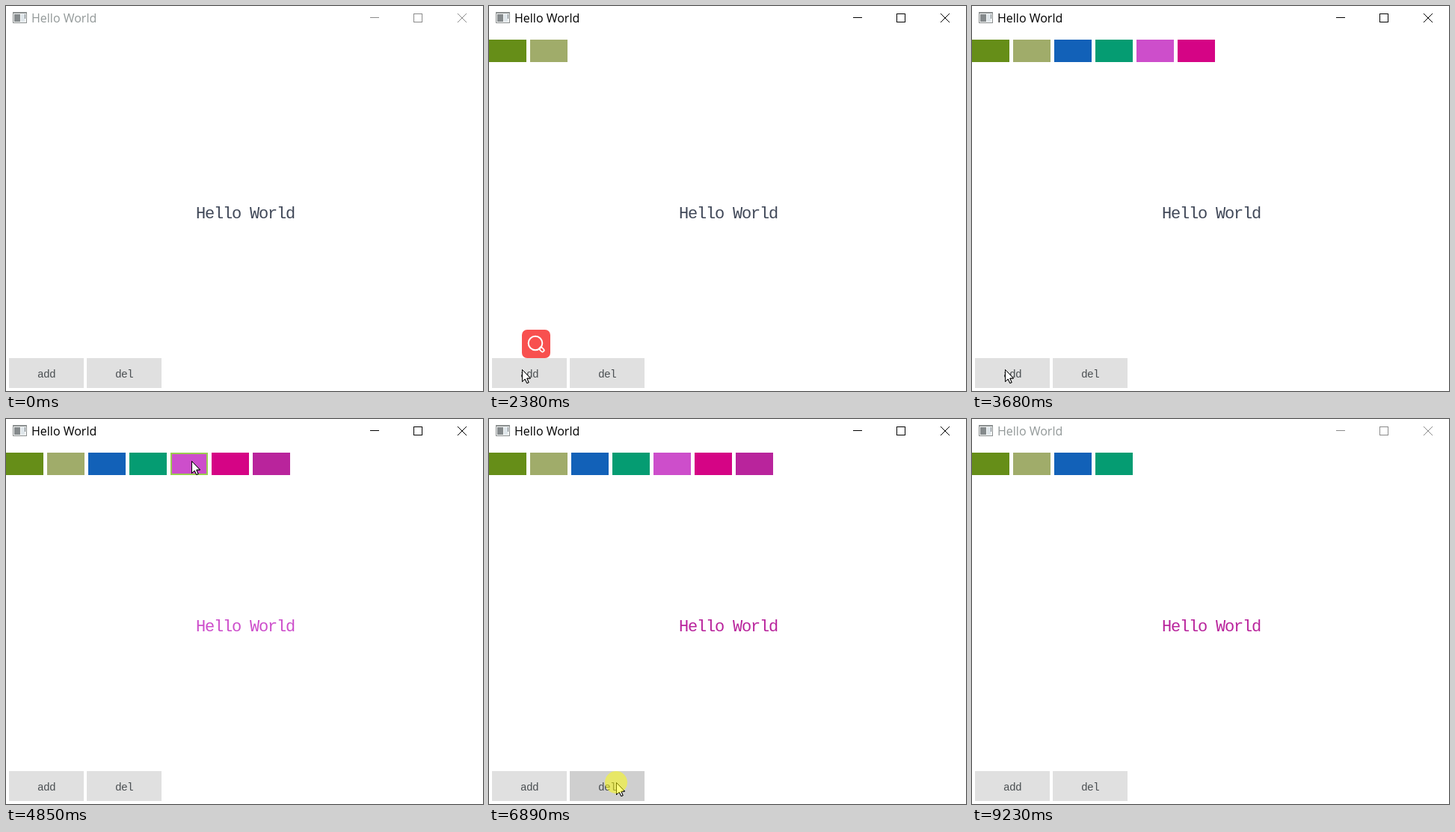
Animation of 638x515 px, one loop 9330 ms. Source, as an HTML page with a canvas:

```html
<!DOCTYPE html>
<html lang="en">
<head>
<meta charset="utf-8">
<title>Hello World</title>
<style>
html, body { margin: 0; width: 100%; height: 100%; overflow: hidden; background: #fff; }
canvas { display: block; }
</style>
</head>
<body>
<canvas id="stage" width="638" height="515"></canvas>
<script>
const ctx = document.getElementById('stage').getContext('2d');
const LOOP = 9330;
const ACTIVE = { from: 910, to: 9230 };
const PRESS = 65;
const POPUP_DELAY = 30;
const MONO = '"Liberation Mono", monospace';
const COLORS = ['#668e18', '#a0ac6a', '#1261b8', '#059c72', '#cd4ecb', '#d50485', '#b9249c'];

const swatchX = i => i * 55;
const add = { label: 'add', left: 4, x: 44, y: 486, change: 1 };
const del = { label: 'del', left: 108, x: 170, y: 486, change: -1 };
const swatch = i => ({ x: swatchX(i) + 28, y: 56, change: 0, color: COLORS[i] });

// The second half of a quick double click leaves the row unchanged
function burst(target, start, period = 0, count = 1, ignoreEvery = Infinity) {
  return Array.from({ length: count }, (_, i) => ({
    target,
    time: start + i * period,
    change: (i + 1) % ignoreEvery ? target.change : 0
  }));
}

const clicks = [
  ...burst(add, 910, 420, 4, 2),
  ...burst(add, 2535, 177.5, 10, 2),
  ...burst(swatch(4), 4700),
  ...burst(swatch(6), 5620),
  ...burst(del, 6890, 463, 4, 3)
];

const entry = { x: 230, y: 498 };
const exit = { x: 375, y: 495 };
const moves = [
  { from: 110, to: 740, goal: add },
  { from: 4180, to: 4660, goal: swatch(4) },
  { from: 5200, to: 5560, goal: swatch(6) },
  { from: 5740, to: 6740, goal: del },
  { from: 8630, to: 8740, goal: exit }
];

const clamp = v => Math.max(0, Math.min(1, v));
const easeOut = v => 1 - (1 - v) ** 3;
const easeInOut = v => v * v * (3 - 2 * v);

function pointerAt(t) {
  if (t < moves[0].from || t >= moves.at(-1).to) return null;
  let { x, y } = entry;
  moves.forEach(({ from, to, goal }, i) => {
    const k = (i ? easeInOut : easeOut)(clamp((t - from) / (to - from)));
    x += (goal.x - x) * k;
    y += (goal.y - y) * k;
  });
  return { x: Math.round(x), y: Math.round(y) };
}

function rect(x, y, w, h, color) {
  ctx.fillStyle = color;
  ctx.fillRect(x, y, w, h);
}

function text(str, x, y, font, color, spacing = 0) {
  ctx.font = font;
  ctx.letterSpacing = spacing + 'px';
  ctx.fillStyle = color;
  ctx.fillText(str, x, y);
}

function line(points, color, width, closed) {
  ctx.beginPath();
  points.forEach(([x, y]) => ctx.lineTo(x, y));
  if (closed) ctx.closePath();
  ctx.strokeStyle = color;
  ctx.lineWidth = width;
  ctx.stroke();
}

function circle(x, y, r) {
  ctx.beginPath();
  ctx.arc(x, y, r, 0, Math.PI * 2);
}

function drawTitleBar(active) {
  rect(9, 8, 19, 15, '#8c9090');
  rect(10, 10, 17, 12, '#f4f6f6');
  rect(11, 11, 8, 10, '#858a8c');
  rect(20, 11, 5, 10, '#dfe6ea');
  rect(25, 11, 1, 6, '#7d8488');
  text('Hello World', 34, 22, '16px "Open Sans", sans-serif', active ? '#000' : '#929898');
  const color = active ? '#000' : '#8a8a8a';
  rect(487, 15, 12, 1, color);
  ctx.strokeStyle = color;
  ctx.lineWidth = 1;
  ctx.strokeRect(545.5, 10.5, 11, 11);
  line([[604, 10], [616, 22]], color, 1);
  line([[616, 10], [604, 22]], color, 1);
}

function drawSwatch(i, pointer) {
  const x = swatchX(i);
  const hovered = pointer && pointer.x >= x && pointer.x < x + 50 &&
    pointer.y >= 45 && pointer.y < 75;
  rect(x, 45, 50, 30, COLORS[i]);
  if (hovered) {
    ctx.strokeStyle = '#9acd50';
    ctx.lineWidth = 2;
    ctx.strokeRect(x + 1, 46, 48, 28);
  }
}

function drawButton({ label, left }, pressed) {
  rect(left, 471, 100, 40, pressed ? '#cfcfcf' : '#e0e0e0');
  text(label, left + 38, 497, '14.5px ' + MONO, '#4c5053', -0.7);
}

function drawPopup(x) {
  ctx.save();
  ctx.translate(x, 433);
  ctx.beginPath();
  ctx.roundRect(0, 0, 38, 38, 7);
  ctx.fillStyle = '#f8504f';
  ctx.fill();
  ctx.lineCap = 'round';
  circle(18, 18, 9.3);
  ctx.strokeStyle = '#fff';
  ctx.lineWidth = 2;
  ctx.stroke();
  line([[25.5, 25.5], [27.5, 27.5]], '#fff', 6);
  line([[26, 26], [27.5, 27.5]], '#f8504f', 2.5);
  ctx.restore();
}

function drawPointer({ x, y }) {
  ctx.save();
  ctx.translate(x + 0.5, y + 0.5);
  const arrow = [[0, 0], [0, 16], [3.7, 12.5], [6.3, 18], [8.6, 17], [6.2, 11.5], [11, 11.5]];
  line(arrow, '#000', 1, true);
  ctx.fillStyle = '#fff';
  ctx.fill();
  line(arrow, '#000', 1, true);
  ctx.restore();
}

function draw(t) {
  const pointer = pointerAt(t);
  const active = t >= ACTIVE.from && t < ACTIVE.to;
  const last = clicks.findLast(c => t >= c.time);
  const pressing = last && t < last.time + PRESS;
  const done = clicks.filter(c => t >= c.time + PRESS);
  const count = done.reduce((sum, c) => sum + c.change, 0);
  const picked = done.findLast(c => c.target.color);

  rect(0, 0, 638, 515, '#fff');
  drawTitleBar(active);
  for (let i = 0; i < count; i++) drawSwatch(i, pointer);
  text('Hello World', 254, 284, '22px ' + MONO, picked ? picked.target.color : '#404858', -1.2);
  for (const button of [add, del]) drawButton(button, pressing && last.target === button);

  const settled = last && t >= last.time + PRESS + POPUP_DELAY;
  if (active && settled && last.target.label) drawPopup(last.target.x);

  if (pointer) drawPointer(pointer);
  if (pointer && pressing) {
    circle(pointer.x, pointer.y, 15);
    ctx.fillStyle = 'rgba(255, 255, 0, 0.5)';
    ctx.fill();
  }
}

const began = performance.now();
function tick() {
  draw((performance.now() - began) % LOOP);
  requestAnimationFrame(tick);
}
tick();
</script>
</body>
</html>
```
